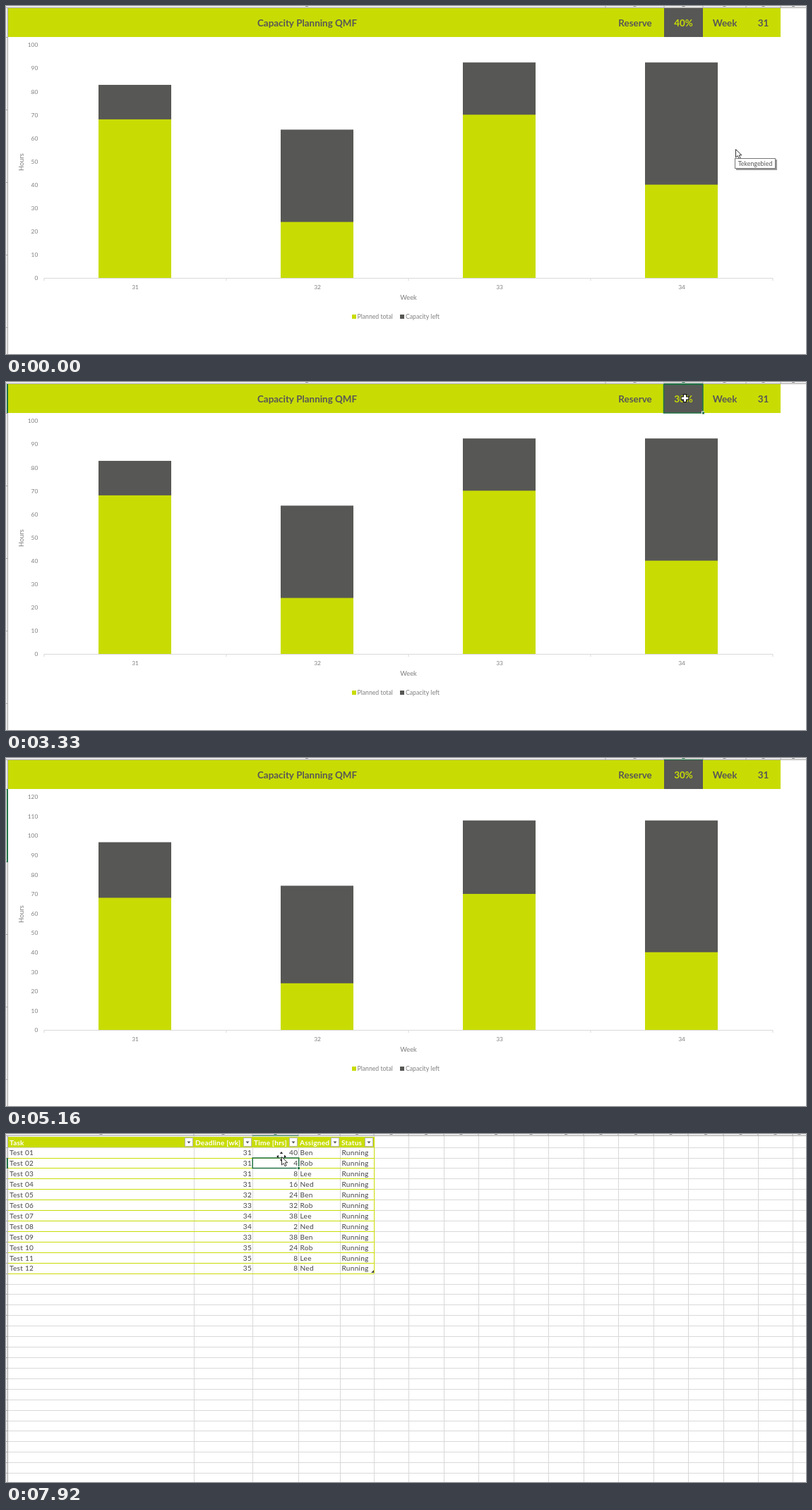
Write an HTML page with a canvas that moves like this. It is 1133x494 px and loops after 8 s.

```html
<!DOCTYPE html>
<html lang="en">
<head>
<meta charset="utf-8">
<title>Capacity planning</title>
<style>
html, body { margin: 0; width: 100%; height: 100%; overflow: hidden; background: #fff; }
canvas { display: block; }
</style>
</head>
<body>
<canvas id="stage" width="1133" height="494"></canvas>
<script>
const ctx = document.getElementById('stage').getContext('2d');
const W = 1133, H = 494, LOOP = 8000;
const LIME = '#c8dc04', DARK = '#575755', GREEN = '#217346', GREY = '#7f7f7f', RULE = '#d9d9d9';

function rect(x, y, w, h, color) {
  ctx.fillStyle = color;
  ctx.fillRect(x, y, w, h);
}

function frame(x, y, w, h, color, width = 1) {
  ctx.strokeStyle = color;
  ctx.lineWidth = width;
  ctx.strokeRect(x, y, w, h);
}

// y is the middle of the capital letters
function label(text, x, y, size, color, { align = 'center', bold = false, spacing = 0 } = {}) {
  ctx.font = `${bold ? 'bold ' : ''}${size}px Lato, Carlito, sans-serif`;
  ctx.letterSpacing = spacing + 'px';
  ctx.textAlign = align;
  ctx.fillStyle = color;
  ctx.fillText(text, x, y + size * 0.36);
}

function polygon(points, fill, stroke) {
  ctx.beginPath();
  points.forEach(([x, y]) => ctx.lineTo(x, y));
  ctx.closePath();
  ctx.fillStyle = fill;
  ctx.fill();
  if (stroke) {
    ctx.strokeStyle = stroke;
    ctx.lineWidth = 1;
    ctx.stroke();
  }
}

// Number of the current step (0..n) for n steps spread from start to end
function stepAt(t, start, end, n) {
  if (t < start) return 0;
  return Math.min(n, Math.floor((t - start) / (end - start) * (n - 1) + 1.001));
}

const mix = (a, b, p) => a + (b - a) * p;
const smooth = p => p * p * (3 - 2 * p);

// Pointers

function arrow(x, y) {
  ctx.save();
  ctx.translate(x + 0.5, y + 0.5);
  polygon([[0, 0], [0, 11.5], [2.7, 9], [4.6, 13.2], [6.6, 12.4], [4.8, 8.3], [8.4, 8.2]], '#fff', '#333');
  ctx.restore();
}

function plus(x, y) {
  const arms = (r, w, color) => {
    rect(x - r, y - w / 2, 2 * r, w, color);
    rect(x - w / 2, y - r, w, 2 * r, color);
  };
  arms(6, 5.4, '#111');
  arms(4.8, 3, '#fff');
}

function movePointer(x, y) {
  for (let i = 0; i < 4; i++) {
    ctx.save();
    ctx.translate(x, y);
    ctx.rotate(i * Math.PI / 2);
    polygon([[0, -7], [2.2, -4], [-2.2, -4]], '#222');
    ctx.restore();
  }
  arrow(x, y);
}

function halo(x, y) {
  ctx.beginPath();
  ctx.arc(x, y, 9.2, 0, 2 * Math.PI);
  ctx.fillStyle = 'rgba(215, 200, 20, 0.62)';
  ctx.fill();
}

// Sheet edges

function topEdge(columns, active) {
  rect(0, 0, W, 2, '#e9e9e9');
  rect(0, 2, W, 1, '#ababab');
  columns.forEach((x, i) => {
    if (x > 3) rect(x - 0.5, 0, 1, 2, '#ababab');
    const next = columns[i + 1] ?? W;
    if (i === active) {
      rect(x, 0, next - x, 2, '#d2d2d2');
      rect(x, 2, next - x, 1, GREEN);
    }
    rect((x + next) / 2 - 2, 0, 4, 1, i === active ? GREEN : '#8a8a8a');
  });
}

function leftEdge(rows, activeFrom, activeTo) {
  rect(0, 3, 2, H, '#e9e9e9');
  rect(2, 3, 1, H, '#ababab');
  rows.forEach(y => rect(0, y, 2, 1, '#ababab'));
  if (activeTo) rect(1, activeFrom, 2, activeTo - activeFrom, GREEN);
}

// Chart sheet

const weeks = [
  { week: 31, planned: 68, hours: 138 },
  { week: 32, planned: 24, hours: 106 },
  { week: 33, planned: 70, hours: 154 },
  { week: 34, planned: 40, hours: 154 }
];
const PLOT = { x: 54, y: 386, height: 331, pitch: 258 };

function drawChart(ceiling, share) {
  const unit = PLOT.height / ceiling, bar = PLOT.pitch / 2.5;
  for (let v = 0; v <= ceiling; v += 10) {
    label(v, 45.3, PLOT.y - v * unit + 0.3, 8.4, GREY, { align: 'right' });
  }
  weeks.forEach(({ week, planned, hours }, i) => {
    const x = Math.round(PLOT.x + PLOT.pitch * i + bar * 0.75 - 0.2);
    const total = hours * share * unit;
    rect(x, PLOT.y - total, 103, total, DARK);
    rect(x, PLOT.y - planned * unit, 103, planned * unit, LIME);
    label(week, PLOT.x + PLOT.pitch * (i + 0.5), 398.5, 8.4, GREY);
  });
  rect(PLOT.x, PLOT.y, PLOT.pitch * 4, 1, RULE);
  for (let i = 0; i <= 4; i++) rect(PLOT.x + PLOT.pitch * i - 0.5, PLOT.y, 1, 4, RULE);

  label('Week', 570, 413.5, 9.3, GREY);
  ctx.save();
  ctx.translate(22, 221.5);
  ctx.rotate(-Math.PI / 2);
  label('Hours', 0, 0, 9.3, GREY);
  ctx.restore();
  rect(490, 438, 6, 6, LIME);
  label('Planned total', 497.5, 441, 8.7, GREY, { align: 'left' });
  rect(558, 438, 6, 6, DARK);
  label('Capacity left', 566, 441, 8.7, GREY, { align: 'left' });
}

function reserveText(t) {
  if (t < 3030) return '40%';
  return t < 3130 ? '3%' : '30%';
}

function drawBanner(t, selected) {
  const title = (text, x, color = DARK) => label(text, x, 24.2, 13.4, color, { bold: true });
  rect(3, 3, 1094, 41, LIME);
  rect(932, 3, 55, 41, DARK);
  title('Capacity Planning QMF', 426.5);
  title('Reserve', 891);
  title(reserveText(t), 959.5, LIME);
  title('Week', 1018);
  title('31', 1072.5);
  if (selected) {
    frame(931.5, 3.5, 55.5, 40.5, GREEN, 1.5);
    rect(985, 41.5, 4, 4, '#fff');
    rect(986, 42.5, 3, 3, GREEN);
  }
}

function drawTooltip() {
  rect(1034, 218, 58, 15, '#9a9a9a');
  rect(1032, 216, 58, 15, '#fff');
  frame(1032.5, 216.5, 57, 14, '#767676');
  label('Tekengebied', 1061, 224, 8.9, '#575757');
}

function chartPointer(t) {
  if (t < 1120) {
    const p = smooth(stepAt(t, 510, 920, 5) / 5);
    arrow(mix(1033, 962, p), mix(203, 15, p));
    if (t < 510) drawTooltip();
  } else if (t < 4140) {
    const y = t < 1520 ? 16 : 23;
    if (t < 1220 || (t >= 1730 && t < 1930)) halo(961, y);
    plus(961.5, y);
  } else if (t < 4840) {
    const p = smooth(stepAt(t, 4140, 4640, 6) / 6);
    arrow(mix(961, 197, p), mix(22, 168, p));
  } else if (t < 5160) {
    const p = stepAt(t, 4840, 5160, 4) / 3;
    arrow(mix(197, 107, p), mix(168, 449, p));
  }
}

function chartSheet(t) {
  const selected = t >= 1730 && t < 3840;
  const below = !selected && t >= 1120;
  topEdge([3, 849, 932, 987, 1048, 1097], t >= 1120 ? 2 : -1);
  leftEdge([44, 147, 250, 353, 456], selected ? 3 : 44, selected ? 44 : below ? 148 : 0);
  const grow = 1 - (1 - stepAt(t, 3840, 4640, 9) / 9) ** 2.67;
  drawChart(t < 3840 ? 100 : 120, mix(0.6, 0.7, grow));
  drawBanner(t, selected);
  chartPointer(t);
}

// Task sheet

const columns = [3, 266, 349, 414, 473, 521];
for (let i = 1; i <= 12; i++) columns.push(Math.round(521 + i * 49.45));
const heads = ['Task', 'Deadline [wk]', 'Time [hrs]', 'Assigned', 'Status'];
const deadlines = [31, 31, 31, 31, 32, 33, 34, 34, 33, 35, 35, 35];
const durations = [40, 4, 8, 16, 24, 32, 38, 2, 38, 24, 8, 8];
const people = ['Ben', 'Rob', 'Lee', 'Ned'];
const rowLine = i => Math.round(18.6 + i * 14.92);

function filterButton(right) {
  rect(right - 12, 5, 12, 13, '#fff');
  frame(right - 11.5, 5.5, 11, 12, '#b5b5b5');
  polygon([[right - 8.5, 10.5], [right - 3.5, 10.5], [right - 6, 13.5]], '#555');
}

function tablePointer(t) {
  if (t < 7030) return;
  if (t >= 7920) return movePointer(390, 32);
  const p = smooth((stepAt(t, 7030, 7820, 9) - 1) / 8);
  plus(mix(141, 389, p), mix(450, 38, p));
}

function taskSheet(t) {
  const rows = Array.from({ length: 32 }, (_, i) => rowLine(i));
  rows.forEach(y => rect(3, y, W, 1, RULE));
  columns.slice(1).forEach(x => rect(x, 3, 1, H, RULE));
  topEdge(columns, 2);
  leftEdge(rows, 34, 49);

  rect(3, 4, 518, 15, LIME);
  heads.forEach((text, i) => {
    label(text, columns[i] + 2, 12, 10.1, '#fff', { align: 'left', bold: true, spacing: 0.2 });
    filterButton(columns[i + 1] - 1);
  });
  for (let i = 0; i < 12; i++) {
    const y = 26.7 + i * 14.92;
    const cell = (text, x, align) => label(text, x, y, 10.1, '#444', { align, spacing: 0.25 });
    rect(3, rowLine(i + 1), 518, 1, LIME);
    cell('Test ' + String(i + 1).padStart(2, '0'), 5, 'left');
    cell(deadlines[i], 348, 'right');
    cell(durations[i], 413.3, 'right');
    cell(people[i % 4], 416.5, 'left');
    cell('Running', 475.5, 'left');
  }
  rect(521, 4, 1, 194, LIME);
  polygon([[521, 193], [521, 197], [517, 197]], '#444');

  frame(349.2, 34, 65.5, 14.5, GREEN, 1.5);
  rect(412, 46, 4, 4, '#fff');
  rect(413, 47, 3, 3, GREEN);
  tablePointer(t);
}

function draw(now) {
  const t = now % LOOP;
  rect(0, 0, W, H, '#fff');
  if (t < 6260) chartSheet(t);
  else taskSheet(t);
}

let start;
function tick(now) {
  start ??= now;
  draw(now - start);
  requestAnimationFrame(tick);
}
draw(0);
requestAnimationFrame(tick);
</script>
</body>
</html>
```
